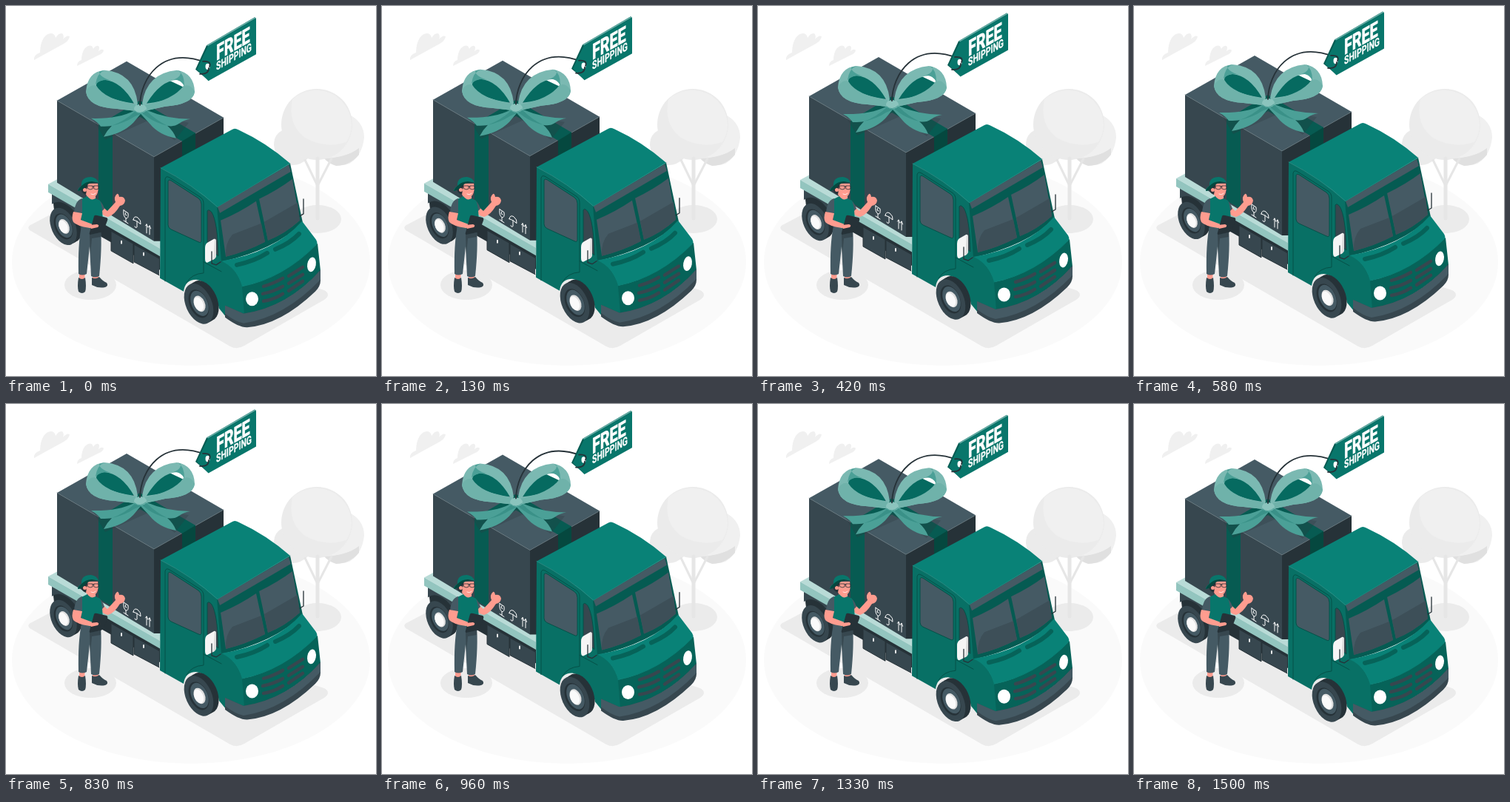
Animation of 500 by 500 pixels, one loop 1.54 s. Source, as an HTML page:

```html
<!DOCTYPE html>
<html lang="en">
<head>
<meta charset="utf-8">
<title>Free shipping</title>
<style>
  html, body { margin: 0; width: 100%; height: 100%; overflow: hidden; background: #fff; }
  svg { display: block; width: 100vw; height: 100vh; }
  .label { font: 700 29px Roboto, sans-serif; fill: #fff; stroke: #fff; stroke-width: .9px; }
  .small { font-size: 15.4px; stroke-width: .3px; }
  .line { fill: none; stroke-linecap: round; stroke-linejoin: round; }
</style>
</head>
<body>
<svg viewBox="0 0 500 500">
  <ellipse cx="250" cy="346" rx="242" ry="140" fill="#fafafa"/>
  <path fill="#ebebeb" d="M33 296 L75 274 L430 384 Q440 390 430 397 L322 459 Q312 465 303 460 L32 303 Q28 299 33 296Z"/>
  <ellipse cx="114" cy="377" rx="35" ry="20" fill="#ebebeb"/>

  <g id="clouds" fill="#f0f0f0">
    <path d="M38 73 Q37 66 46 63 Q46 51 51 43 Q56 36 62 37 Q66 38 67 43 Q71 36 76 37 Q79 40 77 45 Q82 39 86 41 Q85 47 78 51 Z"/>
    <path d="M96 81 Q96 75 102 73 Q102 64 106 58 Q111 52 116 54 L118 58 Q121 53 125 54 Q127 56 125 61 Q130 57 132 60 Q131 64 126 66 Z"/>
  </g>

  <g id="tree">
    <ellipse cx="421" cy="288" rx="32" ry="19" fill="#ebebeb"/>
    <path fill="#ebebeb" d="M376 167 Q362 172 362 188 Q365 212 386 215 Q397 216 408 206 L408 170Z"/>
    <path fill="#f0f0f0" d="M462 146 Q484 156 484 178 Q481 203 464 213 Q446 220 430 206 L440 165Z"/>
    <path fill="#e0e0e0" d="M477 201 Q464 216 446 216 Q436 213 430 206 Q460 205 477 192Z"/>
    <circle cx="420" cy="160" r="48" fill="#ebebeb"/>
    <path fill="#f0f0f0" d="M387 126 A48 48 0 0 1 467 160 Q467 174 460 184 Q430 193 404 178 Q380 160 387 126Z"/>
    <path class="line" stroke="#e6e6e6" stroke-width="3" d="M404 208 L421 243 L440 206"/>
    <path class="line" stroke="#e6e6e6" stroke-width="5" d="M421 206 V287"/>
  </g>

  <g id="truck">
    <!-- chassis -->
    <path fill="#263238" d="M62 250 L208 333 V357 L65 276Z"/>
    <g id="rear"></g>
    <path fill="#37474f" d="M62 268 Q72 260 87 272 Q99 283 101 302 L110 306 V278 L62 250Z"/>
    <path fill="#37474f" d="M142 305 L172 322 V348 L142 331Z M173 323 L207 342 V364 L173 346Z"/>
    <path class="line" stroke="#263238" d="M142 305 V331 L172 348 V322 M173 323 V346 L207 364"/>
    <path class="line" stroke="#ebebeb" stroke-width="2" d="M156 318 V321 M186 334 V337"/>

    <!-- bed -->
    <path fill="#b9dbd7" d="M57 241 L70 234 L214 316 L208 328Z"/>
    <path fill="#93c5bf" d="M57 241 L208 328 V338.500 L57 252Z"/>

    <!-- parcel -->
    <path fill="#455a64" d="M163 75 L294 151 L200 204 L69 128Z"/>
    <path fill="#37474f" d="M69 128 L200 204 V318 L69 239Z"/>
    <path fill="#263238" d="M200 204 L294 151 V205 L214 318 L200 318Z"/>
    <path class="line" stroke="#66777f" stroke-width=".6" d="M69 128 L200 204 L294 151"/>
    <path fill="#075b52" d="M125 161 L181 128 L256 172 V200 L238 204 V183 L181 150 L144 171 V282 L125 271Z"/>
    <path fill="#05483f" d="M238 183 L256 172 V200 L238 204Z"/>
    <g class="line" stroke="#fff">
      <path d="M159 276 L165 280 Q166 288 162 287 Q158 284 159 276Z M162 287 V292 M159 290 L165 294 M162 279 L161 282 L163 283"/>
      <path d="M172 289 Q173 283 178 286 Q183 290 182 295 Q177 290 172 289Z M177 291 V299 Q175 301 174 298"/>
      <path d="M190 307 V295 L188.500 297 M190 295 L191.500 299 M194 309 V297 L192.500 299 M194 297 L195.500 301"/>
    </g>

    <!-- bow -->
    <path fill="#2d3a41" d="M118 154 L172 148 L190 148 L247 158 L228 182 L190 156 L134 181 Z" opacity=".3"/>
    <path fill="#066a60" d="M121 106 Q125 92 140 92 L176 128 L168 134 L132 129Z"/>
    <path fill="#066a60" d="M188 132 Q208 99 229 101 Q234 107 240 107 Q246 122 230 130Z"/>
    <path fill="#fff" d="M221 101 Q232 96 240 102 L240 110Z"/>
    <path fill="#4ba097" d="M173 142 Q151 153 115 152 Q124 157 128 163 Q139 163 143 162 Q136 169 132 177 Q157 173 172 158 L182 146 L194 159 Q207 175 230 179 Q226 169 218 162 Q227 164 234 159 Q241 154 249 153 Q218 153 190 141Z"/>
    <path fill="#3a9188" d="M182 146 L174 143 Q160 156 143 162 Q161 158 173 150Z M184 145 L190 142 Q203 155 218 162 Q202 158 192 151Z"/>
    <path fill="#7bb9b2" fill-rule="evenodd" d="M178 132 Q173 90 133 87 Q110 89 108 116 Q111 137 148 139 L174 142Z M173 132 Q156 102 133 100 Q122 101 122 108 Q127 125 173 132Z"/>
    <path fill="#4ba097" d="M133 87 Q123 91 121 106 Q129 98 142 101 Q126 96 126 89Z"/>
    <path fill="#6fb2aa" d="M108 116 Q111 137 148 139 L174 142 L175 133 Q134 127 122 108 Q113 105 108 116Z"/>
    <path fill="#7bb9b2" fill-rule="evenodd" d="M184 132 Q190 91 231 87 Q254 91 255 116 Q253 133 215 136 L188 142Z M190 132 Q209 101 231 100 Q240 102 240 109 Q234 127 190 132Z"/>
    <path fill="#6fb2aa" d="M255 116 Q253 133 215 136 L188 142 L188 134 Q226 127 240 108 Q250 105 255 116Z"/>
    <path fill="#4ba097" d="M232 87 Q241 92 241 108 Q234 97 223 101 Q237 97 236 89Z"/>
    <ellipse cx="181.500" cy="139" rx="8.500" ry="6" fill="#8bc4bd"/>
    <path class="line" stroke="#4ba097" d="M174 142 Q181 148 189 141"/>

    <!-- tag -->
    <path class="line" stroke="#263238" stroke-width="1.800" d="M181 134 C182 98 210 54 269 76"/>
    <path fill="#055b52" d="M271 53.500 L336 15.500 L338 17 L274 101 L256 86Z"/>
    <path fill="#65ada6" d="M271 53.500 L336 15.500 L338 16.500 L273 54.500Z"/>
    <path fill="#08766b" d="M273 54.500 L338 17 V65.500 L273.500 101.500 L258 86Z"/>
    <ellipse cx="272.500" cy="82" rx="3" ry="4.200" fill="#fff"/>
    <path class="line" stroke="#263238" stroke-width="1.800" d="M266 75 Q278 74 275 82 M274 84 Q274 93 262 92"/>
    <text class="label" transform="matrix(.68 -.384 0 1 284 74)">FREE</text>
    <text class="label small" transform="matrix(.68 -.384 0 1 284 87.500)">SHIPPING</text>

    <!-- cab side -->
    <path fill="#087065" d="M209 219 Q252 241 286 271 L292 343 Q312 354 320 379 L323 416 L297 420 L288 409 Q281 374 257 370 Q242 370 240 386 L208 368Z"/>
    <g class="line" stroke="#055148">
      <path d="M215 372 V234 Q216 229 221 232 L262 258 Q267 261 267 267 V361 Q251 362 244 374"/>
      <path d="M267 346 L291 359"/>
    </g>
    <path fill="#455a64" stroke="#055148" d="M219 238 Q219 234 223 236 L260 260 Q264 263 264 268 V317 Q264 321 260 319 L223 302 Q219 300 219 296Z"/>
    <path fill="#37474f" stroke="#055148" d="M272 277 Q274 274 278 279 Q286 292 287 338 L272 326Z"/>

    <!-- cab front -->
    <path fill="#055b52" d="M285 271 L384 213 L401 293 Q363 330 291 346Z"/>
    <path fill="#098277" d="M209 219 L305 167.500 Q309 164.500 314 167.500 Q352 185 384 213 L286 272 Q252 241 209 219Z"/>
    <path class="line" stroke="#3b9b92" stroke-width=".6" d="M209 219 Q252 241 286 272 L384 213"/>
    <path fill="#455a64" d="M286 272 L382 215 L385 224 L289 280Z"/>
    <path fill="#455a64" d="M290 290 Q316 279 338 264 L350 319 Q325 332 297 339Z M342 261 Q367 249 387 234 L397 290 Q377 308 354 317Z"/>
    <path fill="#3d4f58" d="M297 339 Q296 320 306 309 L345 294 L350 319 Q325 332 297 339Z M349 292 L394 266 L397 290 Q377 308 354 317Z"/>
    <path fill="#098277" d="M291 345 Q363 333 400 291 L419 316 Q423 322 416 329 Q375 368 319 379 Q312 354 291 345Z"/>
    <g class="line" stroke="#066359" stroke-width="6">
      <path d="M312 350 Q336 345 353 334 M364 329 Q385 320 396 308"/>
    </g>
    <path fill="#066359" d="M319 379 Q375 368 421 321 L425 358 Q380 407 322 417Z"/>
    <path class="line" stroke="#098277" d="M319 379 Q375 368 420 322"/>
    <g class="line" stroke="#37474f" stroke-width="4.500">
      <path d="M348 379 Q362 375 374 368 M347 389 Q362 386 374 379 M348 399 Q362 397 374 389"/>
      <path d="M382 365 L401 353 M382 375 L401 363 M382 385 L401 372"/>
    </g>
    <ellipse cx="332.500" cy="396" rx="8.500" ry="9.500" fill="#fff"/>
    <ellipse cx="413" cy="349.500" rx="5.800" ry="10" fill="#fff" transform="rotate(10 413 349.500)"/>
    <g id="front"></g>
    <path fill="#37474f" d="M296 405 L321 416 Q381 407 425 357 V371 Q425 379 418 386 Q371 431 326 434.500 Q315 435 296 421Z"/>
    <path fill="#455a64" d="M296 405 L321 416 Q381 407 425 357 V370 Q376 421 321 429 Q310 427 296 416Z"/>

    <!-- mirrors -->
    <path fill="#f5f5f5" d="M269 327 Q269 321 274 319 L281 315 Q284 314 284 319 V337 Q284 341 280 343 L272 347 Q269 347 269 342Z"/>
    <path fill="#dcdcdc" d="M282 315 Q284 315 284 319 V337 Q284 341 280 343 Z"/>
    <path class="line" stroke="#263238" stroke-width="1.300" d="M278 332 V348 L284 350 L290 346 M402 261 V281 L397 284"/>
  </g>

  <g id="courier">
    <path fill="#ff9c8f" d="M99 357 H107 L106 372 H99Z M117 360 H125 L125 372 H117Z"/>
    <path fill="#37474f" d="M98 367 Q103 371 107 367 Q109 380 107 386 Q103 390 98 386 Q96 379 98 367Z"/>
    <path fill="#37474f" d="M116 367 Q121 370 126 366 Q131 372 136 374 Q139 378 134 380 Q125 382 116 377Z"/>
    <path fill="#455a64" d="M102 297 L128 301 Q130 326 126 365 Q120 368 115 365 L113 325 L109 362 Q103 365 98 362 Q97 322 102 297Z"/>
    <path fill="#37474f" d="M113 309 L128 306 L128 312 L116 314 L114 335Z"/>
    <path fill="#ff9c8f" d="M109 251 H121 V264 H109Z"/>
    <path fill="#ff9c8f" d="M126 267 L137 277 L148 265 Q145 258 150 254 Q152 253 153 258 Q160 257 161 263 Q160 269 154 270 Q146 283 138 285 Q131 284 126 277Z"/>
    <path fill="#455a64" d="M122 261 Q130 263 133 274 L126 281Z"/>
    <path fill="#08766b" d="M102 261 L110 257 Q115 264 121 260 L127 263 Q132 275 130 302 Q114 303 102 296Z"/>
    <path fill="#455a64" d="M103 260 Q94 262 92 278 Q97 281 103 279Z"/>
    <path fill="#ff9c8f" d="M91 278 L103 280 L101 289 L117 295 Q126 293 125 298 Q122 302 113 300 Q95 297 91 292 Q88 287 91 278Z"/>
    <path fill="#263238" d="M119 284 Q120 282 123 283 L136 286 Q138 287 137 290 L132 303 Q131 305 128 306 L114 309 Q112 309 113 306Z"/>
    <path fill="#ff9c8f" d="M113 296 L123 295 Q127 296 124 299 L115 301Z"/>
    <path fill="#ff9c8f" d="M104 240 H124 Q126 250 122 256 Q115 261 108 255 Q103 252 104 240Z"/>
    <path fill="#263238" d="M103 240 L111 239 Q109 247 108 255 Q102 253 101 247Z"/>
    <circle cx="106.500" cy="248.500" r="2.500" fill="#ff9c8f"/>
    <path fill="#08766b" d="M102 243 Q101 231 115 231 Q123 232 125 239 Q116 235 109 241 Q102 250 97 250 Q97 246 102 243Z"/>
    <path fill="#05483f" d="M102 243 Q108 237 116 237 L125 239 Q116 237 109 242 Q102 250 97 250 Q98 246 102 243Z"/>
    <g class="line" stroke="#263238" stroke-width=".8">
      <path d="M110 243 H117 V247 Q114 249 111 247Z M119 243 H125 V247 Q122 249 119 247Z M107 244 H110 M117 244 H119"/>
      <path d="M115 254 Q119 256 121 253" stroke="#fff"/>
    </g>
  </g>
</svg>
<script>
const LOOP = 1540;
const LOW = 1475;   // moment of the lowest position
const LIFT = 8.6;
const byId = id => document.getElementById(id);
const truck = byId("truck");

const ring = (x, y, rx, ry, fill) =>
  `<ellipse rx="${rx}" ry="${ry}" fill="${fill}" transform="translate(${x} ${y}) rotate(-24)"/>`;

function wheel(x, y, s) {
  const rings = [
    [7, -4, 17, 28, "#263238"], [3.5, -2, 17, 28, "#263238"], [0, 0, 17, 28, "#37474f"],
    [0, 0, 12, 19.5, "#263238"], [1, -.5, 10.5, 17.5, "#455a64"],
    [1, 0, 7, 11, "#e0e0e0"], [0, .5, 5.8, 9.5, "#fafafa"]
  ];
  const body = rings.map(r => ring(...r)).join("");
  return `<g transform="translate(${x} ${y}) scale(${s})">${body}</g>`;
}

byId("rear").innerHTML = wheel(77.5, 298, .95);
byId("front").innerHTML = wheel(260.5, 402.5, 1.03);

function draw(time) {
  const turn = 2 * Math.PI * (time % LOOP - LOW) / LOOP;
  const y = -LIFT * (1 - Math.cos(turn)) / 2;
  truck.setAttribute("transform", `translate(0 ${y.toFixed(3)})`);
}

const start = performance.now();
function tick() {
  draw(performance.now() - start);
  requestAnimationFrame(tick);
}
draw(0);
requestAnimationFrame(tick);
</script>
</body>
</html>
```
